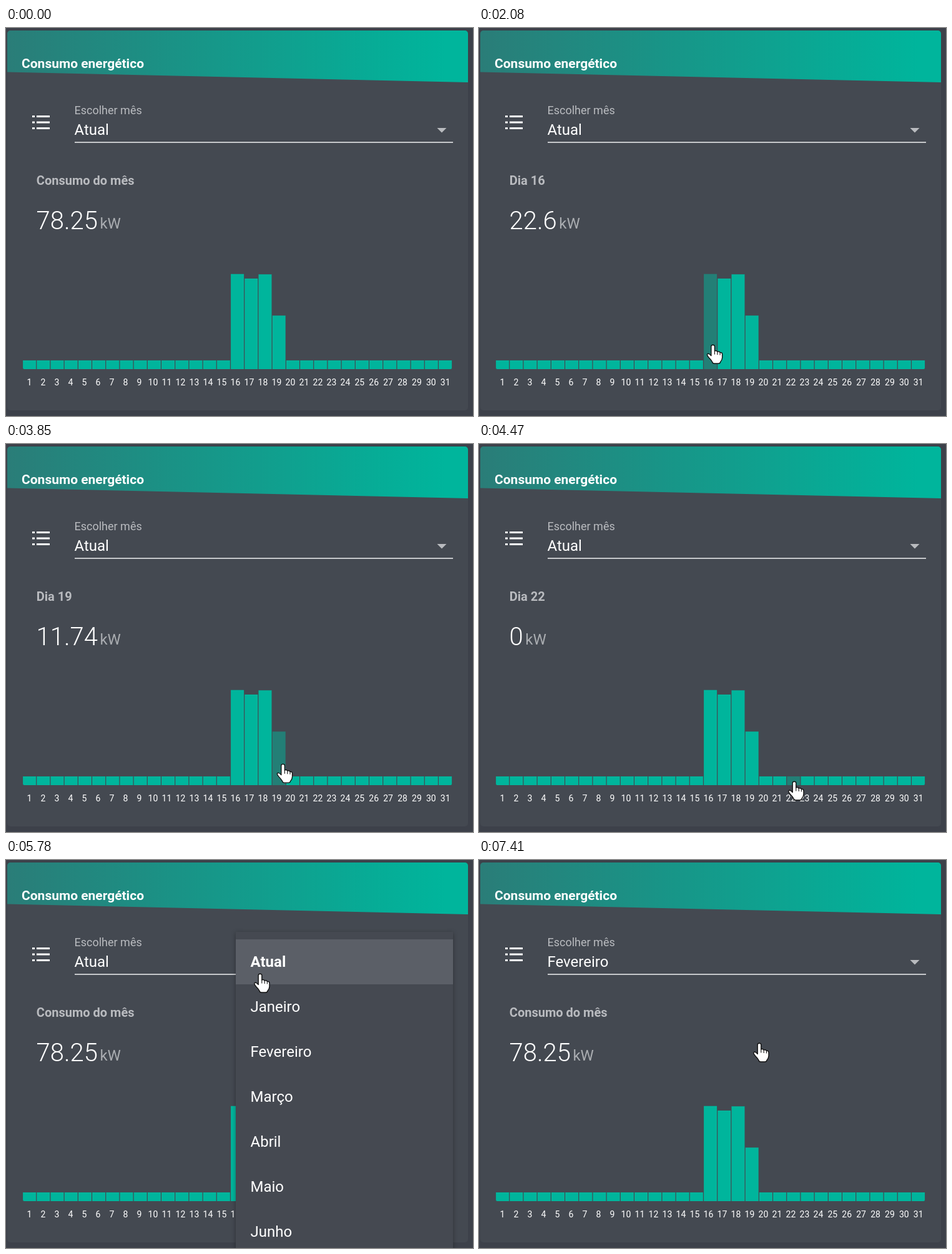
Animation, 748 px wide and 621 px high, one loop 8000 ms. Source, as an HTML page with a canvas:

```html
<!DOCTYPE html>
<html lang="pt">
<head>
<meta charset="utf-8">
<title>Consumo energético</title>
<style>
html, body { margin: 0; width: 100%; height: 100%; overflow: hidden; background: #3d414a; }
canvas { display: block; }
</style>
</head>
<body>
<canvas id="stage" width="748" height="621"></canvas>
<script>
const ctx = document.getElementById('stage').getContext('2d');
const LOOP = 8000;
const TEAL = '#00b59c', DARK_TEAL = '#237f76', CARD = '#444951', GREY = '#b9bbbf';
const MONTHS = ['Atual', 'Janeiro', 'Fevereiro', 'Março', 'Abril', 'Maio', 'Junho'];
const USAGE = { 16: 22.6, 17: 21.41, 18: 22.5, 19: 11.74 };
const MENU = { x: 368, y: 115, w: 348, row: 72, first: 127 };
const FIELD_CLICK = { start: 5155, end: 5350, x: 334, y: 161 };
const ITEM_CLICK = { start: 7095, end: 7245, x: 449, y: 292 };

// Pointer moves: first step, last step, step count, end x, end y, ease-out power
const START = [757, 557];
const MOVES = [
  [1070, 1610, 8, 363.5, 507, 1.5],
  [2080, 2240, 3, 388, 507, 1.5],
  [2540, 2770, 4, 413, 508, 1.5],
  [3080, 3230, 3, 432, 508, 1.5],
  [3850, 4240, 6, 491, 529, 1.2],
  [4390, 4470, 2, 505, 540, 1.5],
  [4770, 5155, 6, 334, 162, 1.4],
  [5630, 5780, 3, 407, 182, 1],
  [5860, 6090, 4, 472, 539, 1.3],
  [6170, 6400, 4, 449, 291, 1.4],
  [6470, 6470, 1, 449, 293, 1]
];

const clamp = v => Math.max(0, Math.min(1, v));
const ramp = (t, a, b) => clamp((t - a) / (b - a));

function pointerAt(t) {
  let [x, y] = START;
  for (const [a, b, n, ex, ey, power] of MOVES) {
    if (t < a) break;
    const step = b > a ? Math.floor((t - a + 2) / (b - a) * (n - 1)) + 1 : n;
    const p = 1 - Math.pow(1 - clamp(step / n), power);
    x += (ex - x) * p;
    y += (ey - y) * p;
  }
  return { x, y };
}

function text(str, x, y, size, color, weight = 400, align = 'left') {
  ctx.font = `${weight} ${size}px Roboto, sans-serif`;
  ctx.textAlign = align;
  ctx.fillStyle = color;
  ctx.fillText(str, x, y);
}

function rect(x, y, w, h, color) {
  ctx.fillStyle = color;
  ctx.fillRect(x, y, w, h);
}

function disc(x, y, r, color) {
  ctx.fillStyle = color;
  ctx.beginPath();
  ctx.arc(x, y, r, 0, Math.PI * 2);
  ctx.fill();
}

const barX = day => 27.1 + 22.2 * (day - 1);
const barTop = day => 532 - 6.12 * (USAGE[day] || 0);
const labelX = day => 37.4 + 22 * (Math.min(day, 24) - 1) + 22.9 * Math.max(0, day - 24);

function hoveredDay(p, t) {
  if (t < 1070 || t > 5100 || p.y > 546) return 0;
  for (let day = 1; day <= 31; day++) {
    if (p.x >= barX(day) && p.x <= barX(day) + 21 && p.y >= barTop(day)) return day;
  }
  return 0;
}

function drawCard() {
  rect(0, 0, 748, 621, '#3d414a');
  ctx.fillStyle = CARD;
  ctx.beginPath();
  ctx.roundRect(2, 4, 738, 608, 5);
  ctx.fill();
  ctx.save();
  ctx.clip();
  const g = ctx.createLinearGradient(2, 0, 740, 0);
  g.addColorStop(0, '#2a7d78');
  g.addColorStop(0.95, TEAL);
  ctx.fillStyle = g;
  ctx.beginPath();
  ctx.moveTo(2, 4);
  ctx.lineTo(740, 4);
  ctx.lineTo(740, 87);
  ctx.lineTo(2, 70.5);
  ctx.fill();
  ctx.restore();
  text('Consumo energético', 25, 64, 21, '#fff', 700);
  for (const y of [140, 149.5, 159]) {
    rect(42, y, 4, 3, '#fff');
    rect(49, y, 21, 3, '#fff');
  }
}

function drawField(t) {
  const age = t - FIELD_CLICK.start;
  const focus = age < 0 ? 0 : 1 - ramp(t, 5550, 5700);
  if (age > 0 && t < 5550) {
    ctx.save();
    ctx.beginPath();
    ctx.rect(26, 121, 690, 62);
    ctx.clip();
    const alpha = 0.25 * (1 - ramp(t, 5310, 5550));
    disc(FIELD_CLICK.x, FIELD_CLICK.y, Math.min(310, age * 0.96), `rgba(255,255,255,${alpha})`);
    ctx.restore();
  }
  text('Escolher mês', 109.5, 138, 18, GREY);
  rect(110, 182, 606, 2, '#c6c8cb');
  if (focus > 0) {
    ctx.globalAlpha = focus;
    text('Escolher mês', 109.5, 138, 18, TEAL);
    const half = 303 * Math.pow(ramp(t, 5155, 5400), 2.5);
    rect(413 - half, 181, half * 2, 3, TEAL);
    ctx.globalAlpha = 1;
  }
  text(t < 7245 ? MONTHS[0] : MONTHS[2], 109.5, 171, 24, '#fff');
  ctx.fillStyle = GREY;
  ctx.beginPath();
  ctx.moveTo(690.5, 160);
  ctx.lineTo(705.5, 160);
  ctx.lineTo(698, 167.5);
  ctx.fill();
}

function drawChart(day) {
  text(day ? 'Dia ' + day : 'Consumo do mês', 48.8, 251, 20, GREY, 700);
  const value = String(day ? USAGE[day] || 0 : 78.25);
  text(value, 48.6, 322, 40, '#fff', 300);
  text('kW', 48.6 + ctx.measureText(value).width + 3.5, 321, 24, '#aaadb1');
  for (let d = 1; d <= 31; d++) {
    ctx.fillStyle = d === day ? DARK_TEAL : TEAL;
    ctx.beginPath();
    ctx.roundRect(barX(d), barTop(d), 21, 546 - barTop(d), [0, 0, d === 31 ? 2 : 0, d === 1 ? 2 : 0]);
    ctx.fill();
    text(d, labelX(d), 572, 14, '#fff', 400, 'center');
  }
}

function drawMenu(t, p) {
  const alpha = ramp(t, 5380, 5545) * (1 - ramp(t, 7245, 7405));
  if (!alpha) return;
  ctx.save();
  ctx.globalAlpha = alpha;
  ctx.shadowColor = 'rgba(0,0,0,.35)';
  ctx.shadowBlur = 7;
  ctx.shadowOffsetY = 2;
  rect(MENU.x, MENU.y, MENU.w, 560, '#454951');
  ctx.shadowColor = 'transparent';
  const active = p.x < MENU.x ? 0 : Math.floor((p.y - MENU.first) / MENU.row);
  rect(MENU.x, MENU.first + active * MENU.row, MENU.w, MENU.row, '#5b5f67');
  MONTHS.forEach((m, i) => text(m, 391.5, 171 + i * MENU.row, 24, '#fff', i ? 400 : 700));
  ctx.restore();
}

const HAND = new Path2D(`M-2.8 3 Q-2.8.7 0 .7 Q2.8.7 2.8 3 V10.5 Q5.5 9 7.2 11.6
  Q10 10.3 11.4 13 Q15 12.3 15 16 V21 Q14.8 25 12 28 Q11.5 30.5 9 30.5 H2
  Q-.5 30.5 -1 28 Q-3 24.5 -6.5 21 Q-10.5 16.5 -8.5 15 Q-6 13.8 -2.8 18 Z`);
const CREASES = new Path2D('M2.8 10 V16 M7.2 11.6 V16.5 M11.4 13 V17');
const ARROW = new Path2D('M0 0 V23.5 L5.3 18.4 L9 27 L12.8 25.4 L9.2 17 H16.5 Z');

function drawPointer(p, hand) {
  ctx.save();
  ctx.translate(p.x, p.y - 0.5);
  ctx.fillStyle = '#fff';
  ctx.strokeStyle = '#111';
  ctx.lineJoin = 'round';
  ctx.lineWidth = 1.4;
  const shape = hand ? HAND : ARROW;
  ctx.fill(shape);
  ctx.stroke(shape);
  if (hand) {
    ctx.lineWidth = 1.1;
    ctx.stroke(CREASES);
  }
  ctx.restore();
}

function draw(t) {
  const p = pointerAt(t);
  const day = hoveredDay(p, t);
  drawCard();
  drawField(t);
  drawChart(day);
  drawMenu(t, p);
  for (const c of [FIELD_CLICK, ITEM_CLICK]) {
    if (t >= c.start && t < c.end) disc(c.x, c.y, 18, 'rgba(220,220,26,.62)');
  }
  if (t >= 1070) drawPointer(p, day || t >= FIELD_CLICK.start - 2);
}

function frame(now) {
  draw(now % LOOP);
  requestAnimationFrame(frame);
}
draw(0);
requestAnimationFrame(frame);
</script>
</body>
</html>
```
